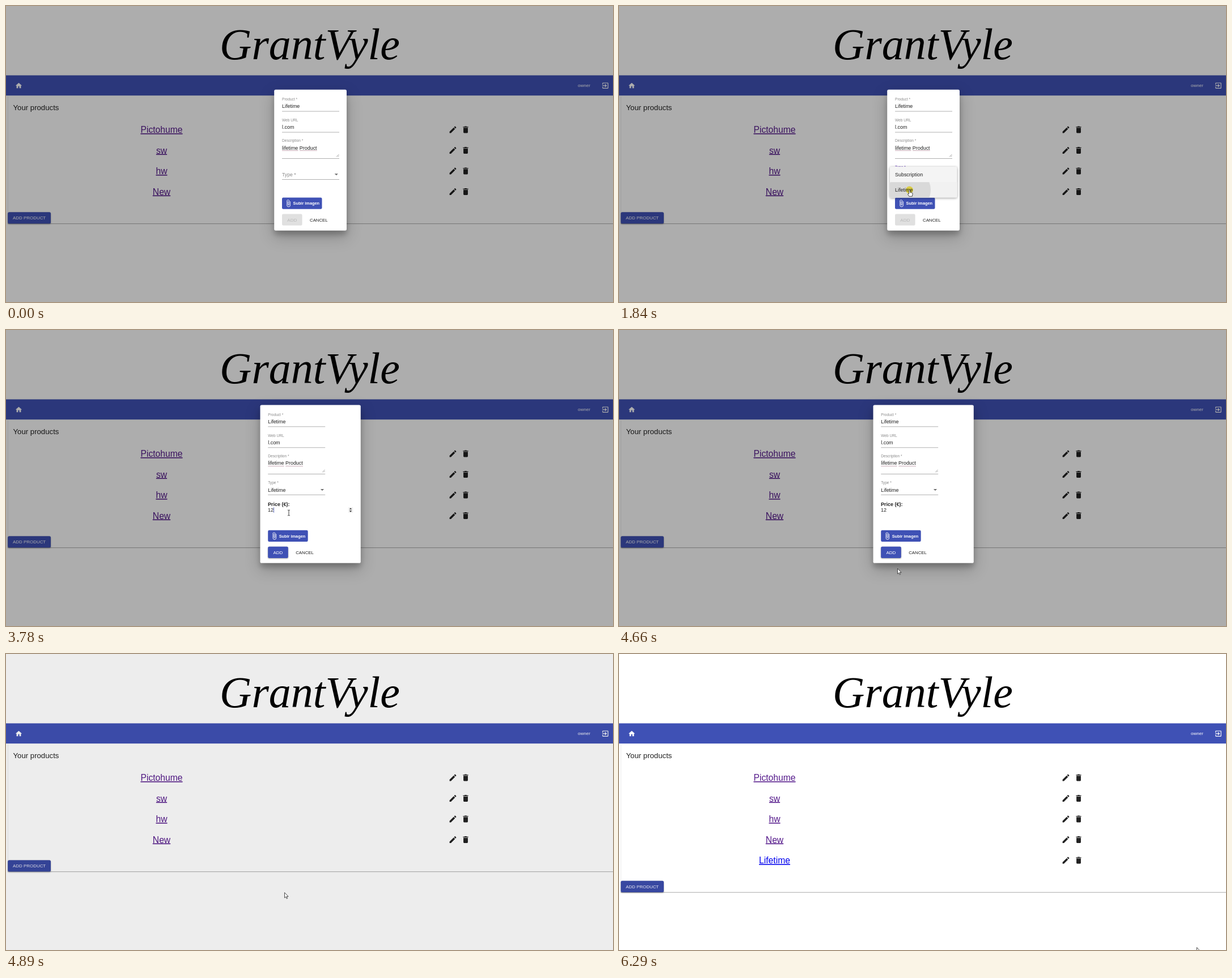
An HTML page that plays this animation: 1071 px wide and 523 px high, repeating every 6.36 s.

```html
<!DOCTYPE html>
<html lang="en">
<head>
<meta charset="utf-8">
<title>Product manager</title>
<style>
  html, body { margin: 0; width: 100%; height: 100%; overflow: hidden; background: #fff; }
  svg { display: block; width: 100%; height: 100%; font-family: "Liberation Sans", Arial, sans-serif; }
  text { white-space: pre; }
  .brand { font: italic 78px "Liberation Serif", serif; }
  .dialog { filter: drop-shadow(0 7px 5px rgba(0,0,0,.2)) drop-shadow(0 9px 13px rgba(0,0,0,.24)); }
  .menu { filter: drop-shadow(0 1.5px 2px rgba(0,0,0,.4)); }
  .button { filter: drop-shadow(0 1px 1px rgba(0,0,0,.35)); }
  .click { mix-blend-mode: multiply; }
</style>
</head>
<body>
<svg id="stage" viewBox="0 0 1071 523"></svg>
<script>
const LOOP = 6360;
const INDIGO = '#3f51b5', INK = '#212121', HINT = '#8a8a8a', FOCUS = '#7044c4';

// Bursts of activity: first change, last change, number of changes
const BURSTS = [
  [130, 680, 8], [990, 1550, 8], [1840, 2090, 4], [2240, 2640, 6], [3110, 3110, 1],
  [3250, 3560, 5], [3780, 4340, 8], [4420, 4660, 4], [4800, 5120, 5],
  [5270, 5500, 4], [5660, 5970, 5], [6210, 6290, 2]
];

// Pointer path: time, x, y
const POINTER = [
  [0, 900, 530], [130, 851, 495], [290, 735, 425], [445, 590, 336], [600, 520, 296],
  [680, 512.5, 293], [1230, 512.5, 294], [1550, 512.5, 325], [1840, 512.5, 325],
  [2090, 512.5, 328], [2240, 511, 334], [2320, 507, 341], [2480, 499, 323],
  [3780, 499, 323], [4340, 517, 377], [4500, 502, 398], [4660, 491.5, 421.5],
  [5120, 491.5, 421.5], [5500, 549, 451], [5660, 575, 467], [5893, 818, 513],
  [5970, 900, 530], [6130, 985, 530], [6210, 1002, 518.5], [6290, 1019.5, 518.5]
];

const ICONS = {
  home: 'M10 20v-6h4v6h5v-8h3L12 3 2 12h3v8z',
  exit: 'M10.09 15.59L11.5 17l5-5-5-5-1.41 1.41L12.67 11H3v2h9.67zM19 3H5c-1.11 0-2 .9-2 2v4h2V5h14v14H5v-4H3v4c0 1.1.89 2 2 2h14c1.1 0 2-.9 2-2V5c0-1.1-.9-2-2-2z',
  edit: 'M3 17.25V21h3.75L17.81 9.94l-3.75-3.75zM20.71 7.04c.39-.39.39-1.02 0-1.41l-2.34-2.34c-.39-.39-1.02-.39-1.41 0l-1.83 1.83 3.75 3.75z',
  trash: 'M6 19c0 1.1.9 2 2 2h8c1.1 0 2-.9 2-2V7H6zM19 4h-3.5l-1-1h-5l-1 1H5v2h14z',
  clip: 'M16.5 6v11.5c0 2.21-1.79 4-4 4s-4-1.79-4-4V5c0-1.38 1.12-2.5 2.5-2.5s2.5 1.12 2.5 2.5v10.5c0 .55-.45 1-1 1s-1-.45-1-1V6H10v9.5c0 1.38 1.12 2.5 2.5 2.5s2.5-1.12 2.5-2.5V5c0-2.21-1.79-4-4-4S7 2.79 7 5v12.5c0 3.04 2.46 5.5 5.5 5.5s5.5-2.46 5.5-5.5V6z'
};

const clamp = (v, lo = 0, hi = 1) => Math.min(hi, Math.max(lo, v));
const within = (t, from, to) => t >= from && t < to;

const text = (x, y, size, content, fill = INK, extra = '') =>
  `<text x="${x}" y="${y}" font-size="${size}" fill="${fill}" ${extra}>${content}</text>`;
const rect = (x, y, w, h, fill, extra = '') =>
  `<rect x="${x}" y="${y}" width="${w}" height="${h}" fill="${fill}" ${extra}/>`;
const path = (d, fill, extra = '') => `<path d="${d}" fill="${fill}" ${extra}/>`;
const group = (content, extra) => `<g ${extra}>${content}</g>`;
const icon = (name, cx, cy, size, fill) =>
  path(ICONS[name], fill, `transform="translate(${cx - size / 2} ${cy - size / 2}) scale(${size / 24})"`);

function snap(t) {
  let snapped = 0;
  for (const [start, end, count] of BURSTS) {
    if (t < start) break;
    const gap = (end - start) / Math.max(1, count - 1);
    snapped = gap ? Math.min(end, start + Math.floor((t - start) / gap + 1e-6) * gap) : start;
  }
  return snapped;
}

function pointerAt(t) {
  const next = POINTER.findIndex(key => key[0] > t);
  if (next < 0) return POINTER[POINTER.length - 1].slice(1);
  const [t0, x0, y0] = POINTER[next - 1], [t1, x1, y1] = POINTER[next];
  const k = (t - t0) / (t1 - t0);
  return [x0 + (x1 - x0) * k, y0 + (y1 - y0) * k];
}

function page(t) {
  const products = ['Pictohume', 'sw', 'hw', 'New'];
  if (t >= 5040) products.push('Lifetime');
  const bottom = 238.5 + products.length * 36.5;
  const rows = products.map((name, i) => {
    const y = 218.5 + i * 36.5;
    return text(274.5, y + 5.5, 15.7, name, name === 'Lifetime' ? '#0000ee' : '#551a8b',
      'text-anchor="middle" text-decoration="underline"') +
      icon('edit', 788.5, y, 15.75, INK) + icon('trash', 811, y, 15.75, INK);
  }).join('');
  return rect(0, 0, 1071, 523, '#fff') +
    text(536, 94, 78, 'GrantVyle', '#000', 'class="brand" text-anchor="middle"') +
    rect(0, 122.5, 1071, 35.7, INDIGO) +
    icon('home', 22.5, 140.7, 13.4, '#fff') +
    text(1009, 143.2, 8, 'owner', '#fff') +
    icon('exit', 1057.5, 140.7, 14, '#fff') +
    rect(3, 160, .7, bottom - 160, '#e4e4e4') +
    rect(3, bottom - .3, 1068, 1, '#a8a8a8') +
    text(12.5, 184.3, 13.2, 'Your products') +
    rows +
    rect(3.2, bottom - 20.3, 75.8, 20.3, t >= 4800 ? '#3848a1' : INDIGO, 'rx="2.5" class="button"') +
    text(12, bottom - 7.2, 7.95, 'ADD PRODUCT', t >= 4800 ? '#e8e8f2' : '#fff');
}

const underline = y => rect(487, y, 101, .7, '#8f8f8f');
const field = (y, label, value) =>
  text(487, y, 6.6, label, HINT) + text(487, y + 13.3, 8.95, value);

function priceField(t) {
  const value = t >= 3480 ? '12' : t >= 3250 ? '1' : '';
  const caret = within(t, 2640, 3110) || within(t, 3250, 4060);
  const spinner = within(t, 2480, 4500);
  return text(486.7, 326.3, 9, 'Price (€):', INK, 'font-weight="bold"') +
    text(486.7, 336.5, 9, value) +
    (caret ? rect(486.8 + value.length * 5.1, 328.5, .8, 9.5, INDIGO) : '') +
    (spinner ? rect(629, 328.3, 8, 9.8, '#f0f0f0') +
      path('M630.6 332.2l2.2-2.8 2.2 2.8zM630.6 334.3l2.2 2.8 2.2-2.8z', '#444') : '');
}

function dialogButtons(t) {
  const enabled = t >= 3250 ? clamp((t - 3170) / 300) : 0;
  return rect(487, 338.5, 70.5, 20.2, INDIGO, 'rx="2.2"') +
    icon('clip', 498.3, 348.7, 14.2, '#fff') +
    text(506.5, 351.4, 7.35, 'Subir imagen', '#fff', 'font-weight="bold"') +
    rect(487, 367.6, 35.6, 20.2, '#e0e0e0', 'rx="2.2"') +
    text(496.3, 380.6, 8, 'ADD', '#b8b8b8') +
    group(rect(487, 367.6, 35.6, 20.2, INDIGO, 'rx="2.2" class="button"') +
      text(496.3, 380.6, 8, 'ADD', '#fff'), `opacity="${enabled}"`) +
    text(536, 380.6, 7.8, 'CANCEL');
}

function dialog(t) {
  const chosen = t >= 1900;
  const floating = t >= 1070;
  const focused = within(t, 1070, 2480);
  const frame = chosen ? rect(448.5, 132.5, 177.3, 279.3, '#fff', 'rx="2.6" class="dialog"')
    : rect(473.2, 147.7, 127.8, 249, '#fff', 'rx="2.6" class="dialog"');
  const fields =
    field(166.8, 'Product *', 'Lifetime') + underline(185.7) +
    field(203.8, 'Web URL', 'l.com') + underline(222.7) +
    field(240.3, 'Description *', 'lifetime Product') + underline(269.2) +
    rect(487, 255.2, 28.5, .6, '#a8788a') + rect(518, 255.2, 30.8, .6, '#a8788a') +
    '<path d="M583 266.5l4.3-4.3M585.4 266.5l1.9-1.9" stroke="#777" stroke-width=".7"/>' +
    (floating ? text(487, 287.3, 6.6, 'Type *', focused ? FOCUS : HINT)
      : text(487, 300.8, 8.7, 'Type *', HINT)) +
    (chosen ? text(487, 300.9, 8.95, 'Lifetime') + priceField(t) : '') +
    path('M579.7 296.2h6.2l-3.1 3.1z', '#6b6b6b') +
    underline(306);
  // The centred dialog grows equally up and down to fit the price field
  const place = dy => chosen ? `transform="translate(-24.8 ${dy})"` : '';
  const opacity = clamp(.27 - (t - 4800) * .006);
  return group(frame + group(fields, place(-15.2)) + group(dialogButtons(t), place(15.2)),
    `opacity="${opacity}"`);
}

function menu(t, pointerY) {
  if (!within(t, 1070, 2000)) return '';
  const grow = clamp((t - 990) / 200);
  const opacity = t >= 1900 ? .4 : grow;
  const hovered = pointerY > 311;
  const ripple = t >= 1840 ? 37 + (t - 1840) * .5 : 0;
  return group(
    rect(477.8, 284, 118.8, 54.5, '#f4f4f4', 'rx="2.4" class="menu"') +
    '<clipPath id="item"><rect x="477.8" y="311.2" width="118.8" height="27.1"/></clipPath>' +
    (hovered ? rect(477.8, 311.2, 118.8, 27.1, '#f1f1f1') : '') +
    `<circle cx="513" cy="325" r="${ripple}" fill="#d9d9d9" clip-path="url(#item)"/>` +
    text(487, 300.9, 8.95, 'Subscription') + text(487, 327.9, 8.95, 'Lifetime'),
    `opacity="${opacity}" transform="translate(0 284) scale(1 ${.8 + .2 * grow}) translate(0 -284)"`);
}

function pointer(t, x, y) {
  const clicking = within(t, 990, 1140) || within(t, 1840, 1920) || within(t, 2480, 2600) || within(t, 4500, 4580);
  const outline = 'stroke-width=".8" stroke-linejoin="round"';
  const shapes = {
    arrow: path('M0 0V9.4L2.2 7.4 3.7 10.8 5.2 10.1 3.7 6.9H6.6Z', '#fff', `stroke="#222" ${outline}`),
    hand: path('M-1 .9Q0-.6 1 .9V4.2L4.5 5Q5.8 5.4 5.6 7L4.8 11.3H-.7L-3 7.6Q-3 6.2-1 7Z', '#fff', `stroke="#222" ${outline}`),
    beam: '<path d="M-2-4.8H-.5L0-4.3.5-4.8H2M0-4.3V4.3M-2 4.8H-.5L0 4.3.5 4.8H2" fill="none" stroke="#222" stroke-width=".9"/>'
  };
  const kind = within(t, 590, 1900) ? 'hand' : within(t, 2100, 4700) && y < 330 ? 'beam' : 'arrow';
  return (clicking ? `<circle class="click" cx="${x}" cy="${y}" r="6.5" fill="#ffee33" opacity=".85"/>` : '') +
    group(shapes[kind], `transform="translate(${x} ${y})"`);
}

function scene(t) {
  const [x, y] = pointerAt(t);
  const shade = clamp(.23 - (t - 4800) * .002, 0, .32);
  return page(t) + rect(0, 0, 1071, 523, '#000', `opacity="${shade}"`) +
    dialog(t) + menu(t, y) + pointer(t, x, y);
}

const stage = document.getElementById('stage');
let shown = -1;
function draw() {
  const t = snap(performance.now() % LOOP);
  if (t !== shown) stage.innerHTML = scene(shown = t);
  requestAnimationFrame(draw);
}
draw();
</script>
</body>
</html>
```
